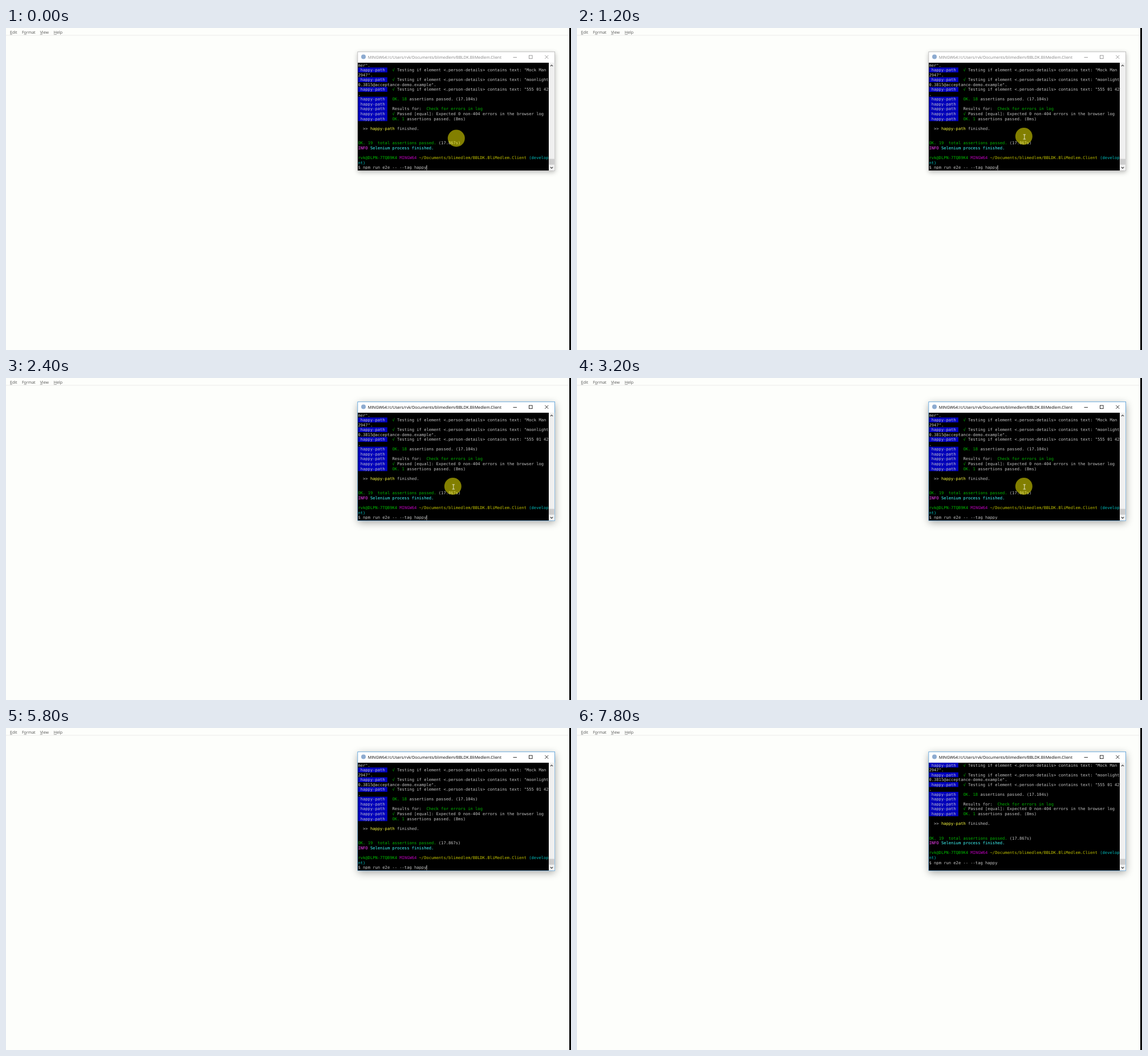
An HTML page with a canvas for the animation above (8000 ms loop, 991 by 565 pixels).

```html
<!DOCTYPE html>
<html lang="en">
<head>
<meta charset="utf-8">
<title>Terminal</title>
<style>
  html, body { margin: 0; width: 100%; height: 100%; overflow: hidden; background: #fdfefb; }
  canvas { display: block; }
</style>
</head>
<body>
<canvas id="stage" width="991" height="565"></canvas>
<script>
const ctx = document.getElementById('stage').getContext('2d');
const LOOP = 8000;
const UI = '"Open Sans", sans-serif';
const CELL = { w: 4.283, h: 8.55 };
const TERM = { x: 617.5, y: 60.7, w: 334.5, h: 189.3 };
const C = {
  gray: '#c4c4c4', green: '#00b800', yellow: '#bfbf00', cyan: '#00bfbf', magenta: '#bf00bf',
  blue: '#0000be', brightYellow: '#ffff40', brightCyan: '#40ffff', brightMagenta: '#ff40ff'
};

// A row is a list of [column, color, text]; label rows begin with a blue tag.
const label = (...parts) => ({ tag: true, parts: [[1, C.gray, 'happy-path'], ...parts] });
const line = (...parts) => ({ parts });
const check = text => label([14, C.green, '√'], [16, C.gray, text]);
const contains = text => check('Testing if element <.person-details> contains text: "' + text);

const rows = [
  line([0, C.gray, 'mer".']),
  contains('Mock Man'),
  line([0, C.gray, '2947".']),
  contains('moonlight'),
  line([0, C.gray, '0.3815@acceptance-demo.example".']),
  contains('555 01 42'),
  line([0, C.gray, '.']),
  label([14, C.green, 'OK. 18'], [21, C.gray, 'assertions passed. (17.104s)']),
  label(),
  label([14, C.gray, 'Results for:'], [28, C.green, 'Check for errors in log']),
  check('Passed [equal]: Expected 0 non-404 errors in the browser log'),
  label([14, C.green, 'OK. 1'], [20, C.gray, 'assertions passed. (8ms)']),
  line(),
  line([2, C.gray, '>>'], [5, C.brightYellow, 'happy-path'], [16, C.gray, 'finished.']),
  line(),
  line(),
  line([0, C.green, 'OK. 19  total assertions passed.'], [33, C.gray, '(17.867s)']),
  line([0, C.brightMagenta, 'INFO'], [5, C.brightCyan, 'Selenium process finished.']),
  line(),
  line([0, C.green, 'rvk@DLPN-7TQB9K4'], [17, C.magenta, 'MINGW64'],
    [25, C.yellow, '~/Documents/blimedlem/BBLDK.BliMedlem.Client'], [70, C.cyan, '(develop']),
  line([0, C.cyan, 'nt)']),
  line([0, C.gray, '$ npm run e2e -- --tag happy'])
];

function rect(x, y, w, h, color) {
  ctx.fillStyle = color;
  ctx.fillRect(x, y, w, h);
}

function text(str, x, y, color) {
  ctx.fillStyle = color;
  ctx.fillText(str, x, y);
}

function stroke(points, color, width = 0.8) {
  ctx.strokeStyle = color;
  ctx.lineWidth = width;
  ctx.beginPath();
  points.forEach(([x, y], i) => i ? ctx.lineTo(x, y) : ctx.moveTo(x, y));
  ctx.stroke();
}

function disc(x, y, r, color) {
  ctx.fillStyle = color;
  ctx.beginPath();
  ctx.arc(x, y, r, 0, Math.PI * 2);
  ctx.fill();
}

function drawDesktop() {
  rect(0, 0, 991, 565, '#fdfefb');
  rect(0, 12.5, 988, 0.8, '#e6e6e4');
  ctx.font = '7px ' + UI;
  const menu = [['Edit', 7, 0], ['Format', 28, 1], ['View', 59.7, 0], ['Help', 83.8, 0]];
  for (const [name, x, key] of menu) {
    text(name, x, 9.8, '#505050');
    const start = x + ctx.measureText(name.slice(0, key)).width;
    rect(start, 10.8, ctx.measureText(name[key]).width, 0.7, '#707070');
  }
  rect(988, 0, 3, 565, '#000');
}

function drawWindow(focused) {
  ctx.save();
  ctx.shadowColor = focused ? 'rgba(0,0,0,.38)' : 'rgba(0,0,0,.28)';
  ctx.shadowBlur = focused ? 13 : 8;
  ctx.shadowOffsetY = focused ? 3 : 2;
  rect(616.5, 41.5, 346.5, 209, '#fff');
  ctx.restore();
  rect(616.5, 41.5, 346.5, 209, focused ? '#2b86cf' : '#a6a6a6');
  rect(617.2, 42.2, 345.1, 207.6, '#fff');

  const ink = focused ? '#000' : '#858585';
  disc(627, 50.5, 4, '#8caad0');
  ctx.font = '7.03px ' + UI;
  text('MINGW64:/c/Users/rvk/Documents/blimedlem/BBLDK.BliMedlem.Client', 634.8, 53.7, ink);
  stroke([[889.5, 51.5], [896, 51.5]], ink);
  ctx.strokeRect(917.5, 48.1, 5.6, 5.6);
  stroke([[945.3, 47.9], [951.3, 53.9]], ink);
  stroke([[951.3, 47.9], [945.3, 53.9]], ink);

  rect(952, 60.7, 10.3, 189.1, '#f0f0f0');
  rect(952.5, 229.6, 9.3, 10.2, '#cdcdcd');
  stroke([[954.8, 67.2], [957, 65], [959.2, 67.2]], '#404040', 1.1);
  stroke([[954.8, 244], [957, 246.2], [959.2, 244]], '#404040', 1.1);
}

function drawTerminal(scroll, caret) {
  ctx.save();
  ctx.beginPath();
  ctx.rect(617, TERM.y, TERM.x + TERM.w - 617, TERM.h);
  ctx.clip();
  rect(617, TERM.y, 335, TERM.h, '#000');
  ctx.font = '7.11px "DejaVu Sans Mono", monospace';
  rows.forEach((row, i) => {
    const top = TERM.y + (i - scroll) * CELL.h;
    if (row.tag) rect(TERM.x, top, CELL.w * 12, CELL.h + 0.1, C.blue);
    for (const [col, color, str] of row.parts) {
      // Words sit on the character grid.
      for (const word of str.matchAll(/\S+/g)) {
        text(word[0], TERM.x + (col + word.index) * CELL.w, top + 6.8, color);
      }
    }
  });
  if (caret) rect(TERM.x + (scroll ? 0 : 28) * CELL.w, 240.8, 1, 8.6, '#c8c8c8');
  ctx.restore();
}

function drawPointer(x, y, beam) {
  disc(x, y, 15, 'rgba(255,250,0,.51)');
  if (!beam) return;
  const bx = x + 1, by = y + 1;
  stroke([[bx, by - 4], [bx, by + 4]], '#fff');
  for (const end of [-4, 4]) stroke([[bx - 2.2, by + end], [bx + 2.2, by + end]], '#fff');
}

const within = (t, from, to) => t >= from && t < to;

function draw(t) {
  const caret = !within(t, 3200, 3800) && !within(t, 4400, 5800) &&
    !within(t, 6600, 7200) && t < 7800;
  drawDesktop();
  drawWindow(t >= 2400);
  drawTerminal(t >= 6600 ? 1 : 0, caret);
  if (t < 5800) {
    const move = Math.min(1, Math.floor(t / 200) / 2);
    drawPointer(789.8 - 6 * move, 193.5 - 3.5 * move, t >= 200);
  }
}

ctx.textRendering = 'geometricPrecision';
const start = performance.now();
function tick() {
  draw((performance.now() - start) % LOOP);
  requestAnimationFrame(tick);
}
tick();
</script>
</body>
</html>
```
